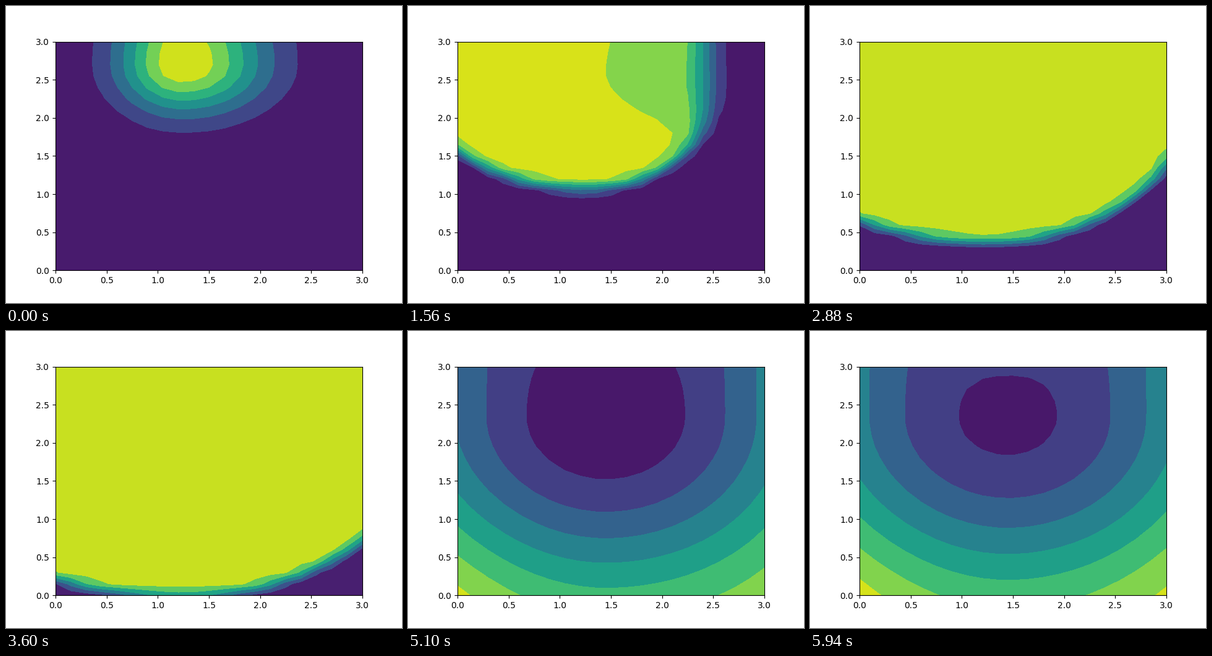
Animation of 640 by 480 pixels, one loop 6 s. Source, as a matplotlib script:

```python
import numpy as np
import matplotlib.pyplot as plt
from matplotlib.animation import FuncAnimation

FRAMES, INTERVAL = 100, 60
SIZE = 3.0
CX = 1.25                  # x of the point where the fire started
CY_LEFT, CY_RIGHT = 2.6, 2.4

axis = np.linspace(0, SIZE, 21)
X, Y = np.meshgrid(axis, axis)


def ramp(t, start, end):
    return np.clip((t - start) / (end - start), 0, 1)


def reach_left(t):
    return .9 + .0305 * t + .0001 * t**2


def reach_right(t):
    """Held back by the wind at first, then steady growth."""
    return 1.16 + .0345 * 3 * np.log1p(np.exp((t - 20.7) / 3))


def bottom(t):
    return 1.82 - .032 * t


def ignition():
    """Lopsided hump of heat at the start."""
    dx, dy = X - 1.24, Y - 2.7
    kx = np.where(dx < 0, 2.55, 1.54)
    ky = np.where(dy < 0, 2.44, .6)
    return 6.9 * np.exp(-kx * dx**2 - ky * dy**2)


def front(t):
    """Depth behind the front, and how squarely a point faces right."""
    left = X < CX
    cy = np.where(left, CY_LEFT, CY_RIGHT)
    a = np.where(left, reach_left(t), reach_right(t))
    b = cy - bottom(t)
    dy = Y - cy
    u = (X - CX) / a
    v = np.where(dy < 0, dy, .2 * dy) / b
    rho = np.hypot(u, v)
    depth = (1 - rho) * rho / (np.hypot(u / a, v / b) + 1e-9)
    facing = np.where(left, 0, (u / rho)**10)
    return depth, facing


def young_plateau(t, depth):
    """Heat behind the young front, with a hot rim on the left."""
    bend = 1.02 + np.maximum(0, 2.65 - Y)**2
    body = np.clip(6 - .55 * (X - bend), 5.2, 6.55)
    rim = 1.06 * np.exp(-((depth - .27) / .07)**2) * ramp(X, .6, .45)
    return body + rim * np.exp(-((t - 16) / 6)**2)


def burnt_plateau(t):
    """Bowl of slowly cooling ground, coolest where it burnt first."""
    lag = np.clip((99 - t) / 14, 0, 2)
    dx, dy = X - 1.45, Y - 2.35
    dx2, dy2 = dx**2, dy**2
    across = 1.35 * dx2 - .05 * dx2**2
    cross = np.where(dx < 0, .06, .1 + .03 * lag) * dx2 * dy2
    below = 1.2 * dy2 - .0575 * dy2**2 - cross
    above = 1.1 * dy2 * np.exp(-2 * dx2)
    bowl = .68 + across + np.where(dy < 0, below, above)
    bowl = bowl * (1 + .05 * lag) - .56 * lag
    return 7.55 + .05 * bowl + .45 * ramp(t, 70, 67)


def heat(t):
    depth, facing = front(t)
    soft = facing * ramp(t, 36, 16)
    z = (depth - .08 - .19 * soft) / (.038 + .12 * soft)
    burning = .5 * (1 + np.tanh(z / 2))
    age = ramp(t, 16, 34)
    plateau = (1 - age) * young_plateau(t, depth) + age * burnt_plateau(t)
    grown = ramp(t, 0, 10)
    return (1 - grown) * ignition() + grown * burning * plateau


fig, ax = plt.subplots(figsize=(6.4, 4.8), dpi=100)


def draw(i):
    ax.clear()
    ax.contourf(X, Y, heat(i))
    ax.set(xlim=(0, SIZE), ylim=(0, SIZE))
    return []


anim = FuncAnimation(fig, draw, frames=FRAMES, interval=INTERVAL,
                     init_func=lambda: draw(0), repeat=True, repeat_delay=0)
plt.show()
```
